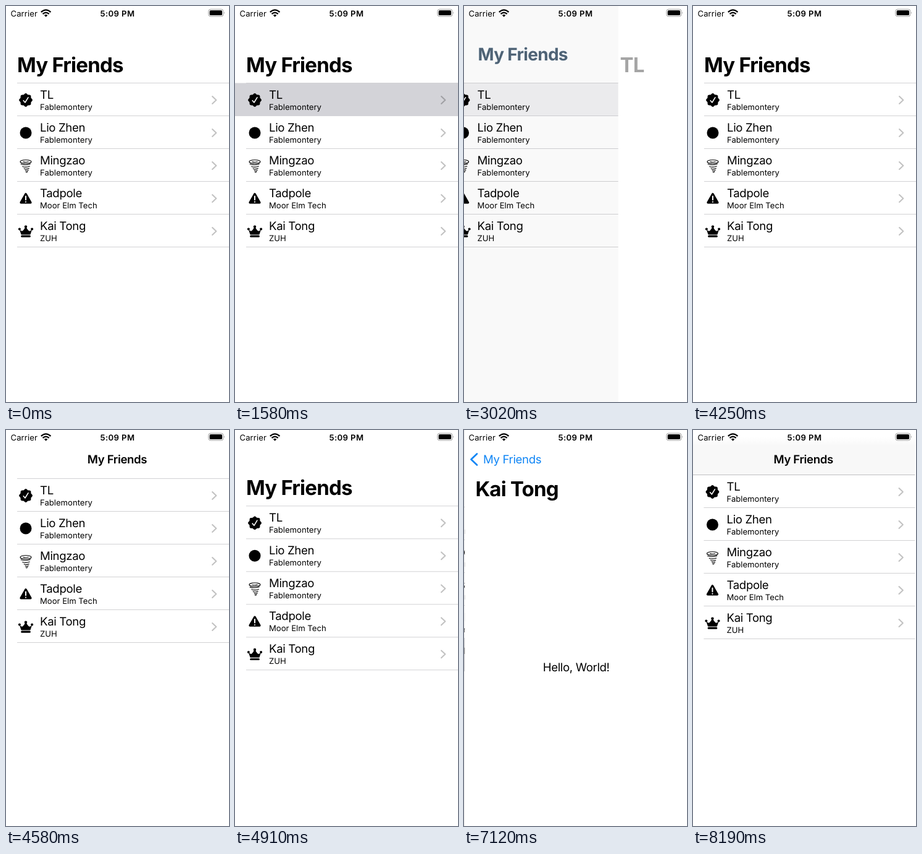
These frames come from a looping animation (361 by 640 pixels, 8.29 s). An HTML page:

```html
<!DOCTYPE html>
<html lang="en">
<head>
<meta charset="utf-8">
<title>My Friends</title>
<style>
  html, body { margin: 0; width: 100%; height: 100%; overflow: hidden; background: #fff; }
  svg { display: block; width: 100vw; height: 100vh; }
  text { font-family: Inter, Roboto, sans-serif; text-rendering: geometricPrecision; white-space: pre; }
  .body { font-size: 18.6px; letter-spacing: -.019em; }
  .sub { font-size: 13.1px; }
  .large { font-size: 33px; font-weight: 700; letter-spacing: -.024em; }
  .semi { font-weight: 600; }
  .line { fill: none; stroke-linecap: round; stroke-linejoin: round; }
</style>
</head>
<body>
<svg viewBox="0 0 361 640">
  <defs>
    <clipPath id="below"><rect y="72" width="361" height="568"/></clipPath>
    <linearGradient id="barTone" x1="0" y1="0" x2="0" y2="1">
      <stop offset=".15" stop-color="#fff"/><stop offset=".35" stop-color="#f8f8f8"/>
    </linearGradient>
  </defs>
  <rect width="361" height="640" fill="#fff"/>

  <g id="list">
    <g id="rows"></g>
    <g id="bar">
      <rect width="361" height="72" fill="url(#barTone)"/>
      <rect y="72" width="361" height="1" fill="#bfbfc1"/>
    </g>
  </g>
  <rect id="dim" width="361" height="640"/>

  <g id="detail">
    <rect width="361" height="640" fill="#fff"/>
    <text class="body" x="180.5" y="389.5" text-anchor="middle">Hello, World!</text>
  </g>

  <g id="nav">
    <path id="arrow" class="line" d="M21 38.5L11.5 47.5L21 56.5" stroke="#0f85f5" stroke-width="2.7"/>
    <text id="backText" fill="#0f85f5">My Friends</text>
    <g id="titleBox"><text id="title">My Friends</text></g>
    <text id="inline" class="body semi" x="180" y="54" text-anchor="middle">My Friends</text>
    <text id="name" class="large" y="106.7"></text>
  </g>

  <g id="status">
    <text class="sub" x="7.5" y="16.5" letter-spacing=".1">Carrier</text>
    <g class="line" stroke="#000" stroke-width="2.3" style="stroke-linecap:butt">
      <path d="M56.8 9.9Q64.6 2.9 72.4 9.9"/>
      <path d="M59.5 12.9Q64.6 8.3 69.7 12.9"/>
    </g>
    <path d="M61.9 14.9Q64.6 12.5 67.3 14.9L64.6 17.7Z"/>
    <text class="sub semi" x="180.5" y="16.5" text-anchor="middle" letter-spacing=".4">5:09 PM</text>
    <rect x="327.8" y="5.3" width="24" height="11.5" rx="3.3" fill="none" stroke="#9a9a9a"/>
    <rect x="329.6" y="7" width="20.4" height="8.1" rx="1.9"/>
    <path d="M353 9.1Q354.8 11 353 13Z" fill="#9a9a9a"/>
  </g>
</svg>

<script>
const $ = id => document.getElementById(id);
const set = (el, attrs) => { for (const k in attrs) el.setAttribute(k, attrs[k]); };
const clamp = x => Math.max(0, Math.min(1, x));

const LOOP = 8290, WIDTH = 361, ROW = 53, TOP = 124.5;

const friends = [
  ["TL", "Fablemontery"],
  ["Lio Zhen", "Fablemontery"],
  ["Mingzao", "Fablemontery"],
  ["Tadpole", "Moor Elm Tech"],
  ["Kai Tong", "ZUH"]
];

function seal() {
  let d = "";
  for (let i = 0; i < 96; i++) {
    const a = i / 96 * 2 * Math.PI, r = 10.1 + .8 * Math.cos(8 * a);
    d += (i ? "L" : "M") + (r * Math.cos(a)).toFixed(2) + " " + (r * Math.sin(a)).toFixed(2);
  }
  return `<path d="${d}Z"/>
    <path class="line" d="M-3.8 .8L-1.1 4L3.9 -4.2" stroke="#fff" stroke-width="1.6"/>`;
}

function tornado() {
  const arcs = [[-7.8, -2.2, 15], [-5.2, 1.4, 11.5], [-2.8, 4.7, 8], [-.8, 7.6, 5], [.2, 10, 2.6]]
    .map(([x, y, w]) => `<path d="M${x} ${y}q${w / 2} 2 ${w} -.3"/>`).join("");
  return `<g class="line" stroke="#000" stroke-width="1.1">
    <ellipse cy="-6.3" rx="9" ry="3"/><path d="M-4 -6.1Q0 -5 4.2 -6.2"/>${arcs}</g>`;
}

const warning = () => `
  <path class="line" d="M0 -7L7.8 6.7H-7.8Z" style="fill:#000" stroke="#000" stroke-width="3.6"/>
  <path class="line" d="M0 -3.4V2.2M0 5.6V5.7" stroke="#fff" stroke-width="2"/>`;

const crown = () => `
  <path d="M-7.4 5.4L-10.2 -3Q-6.8 1 -4.6 -1Q-1.6 -3.6 -.9 -7H.9Q1.6 -3.6 4.6 -1Q6.8 1 10.2 -3L7.4 5.4Z"/>
  <rect x="-7.8" y="6.6" width="15.6" height="3.2" rx="1.5"/>
  <circle cy="-7.4" r="2.2"/><circle cx="-10.1" cy="-3.4" r="2"/><circle cx="10.1" cy="-3.4" r="2"/>`;

const icons = [seal(), '<circle r="9.5"/>', tornado(), warning(), crown()];

let markup = "";
for (let i = 0; i <= friends.length; i++)
  markup += `<rect x="18" y="${TOP - .5 + i * ROW}" width="343" height="1" fill="#d2d2d4"/>`;
friends.forEach(([name, place], i) => {
  markup += `<g transform="translate(0 ${TOP + i * ROW})">
    <rect class="glow" width="361" height="53.5" fill="#d3d3d8"/>
    <g transform="translate(32 27.5)">${icons[i]}</g>
    <text class="body" x="55" y="25.5">${name}</text>
    <text class="sub" x="55" y="43.5">${place}</text>
    <path class="line" d="M334 21.6L340.3 27.5L334 33.4" stroke="#000" stroke-opacity=".24" stroke-width="2.1"/>
  </g>`;
});
$("rows").innerHTML = markup;
const glows = document.querySelectorAll(".glow");

// The picture only changes at these moments.
const steps = [0, 1580, 1700, 1800, 1910, 2020, 2130, 2790, 2900, 3020, 3120, 3240, 3350,
  4250, 4360, 4470, 4580, 4690, 4800, 4910, 6570, 6690, 6790, 6900, 7010, 7120,
  7620, 7730, 7850, 7960, 8070, 8190];

// fold: how far the list is scrolled when it comes back
const visits = [
  { push: 1580, pop: 2790, end: 4250, row: 0, fold: 0 },
  { push: 6570, pop: 7620, end: LOOP, row: 4, fold: 52 }
];

// Critically damped spring from 0 to 1
function spring(ms, w = 15) {
  const x = Math.max(0, ms) / 1000 * w;
  return 1 - (1 + x) * Math.exp(-x);
}

function scroll(t) {
  if (t < 4250) return 0;
  if (t <= 4580) return 46 * Math.sin((t - 4250) / 330 * Math.PI / 2) ** 2;
  return 46 * (1 - spring(t - 4580, 15.5));
}

function draw(t) {
  const v = visits.find(v => t >= v.push && t < v.end);
  const back = v && t >= v.pop;
  const p = !v ? 1 : back ? spring(t - v.pop - 70) : 1 - spring(t - v.push - 20);
  const q = p ** 1.17; // bar items trail the pages a little
  const fold = back ? v.fold : 0;
  const off = v ? fold : scroll(t);

  set($("list"), { transform: `translate(${-.3 * WIDTH * (1 - p)} 0)` });
  set($("rows"), { transform: `translate(0 ${-off})` });
  set($("bar"), { opacity: fold ? q : 0 });
  set($("dim"), { opacity: .08 * (1 - p) });
  set($("detail"), { transform: `translate(${WIDTH * p} 0)` });
  glows.forEach((g, i) => set(g, { opacity: v && v.row === i ? (back ? 1 - p : 1) : 0 }));

  // The back label and the list title share one moving place.
  const pressed = back && t === v.pop ? .3 : 1;
  const place = {
    x: 31 + (fold ? 100 : -13) * q,
    y: 54 + (fold ? 0 : 52.7) * q - (v ? 0 : off)
  };
  const size = 18.6 + (fold ? 0 : 14.4) * q;
  const type = weight => `font-size:${size}px;font-weight:${weight};` +
    `letter-spacing:${weight === 700 ? -.024 : -.019}em`;
  const heavy = fold ? 600 : 700;

  set($("arrow"), { opacity: clamp(1 - 2 * p) * pressed });
  set($("backText"), { ...place, opacity: (1 - q) * pressed, style: type(q > .3 ? heavy : 400) });
  set($("title"), { ...place, opacity: q ** 1.5, style: type(heavy) });
  set($("titleBox"), { "clip-path": !v && off > 0 ? "url(#below)" : "none" });
  set($("inline"), { opacity: v ? 0 : clamp((off - 36) / 8) });

  $("name").textContent = v ? friends[v.row][0] : "";
  set($("name"), { x: 18 + WIDTH * q, opacity: 1 - q });
}

const start = performance.now();
function tick() {
  const now = (performance.now() - start) % LOOP;
  draw(steps.filter(s => s <= now).pop());
  requestAnimationFrame(tick);
}
tick();
</script>
</body>
</html>
```
